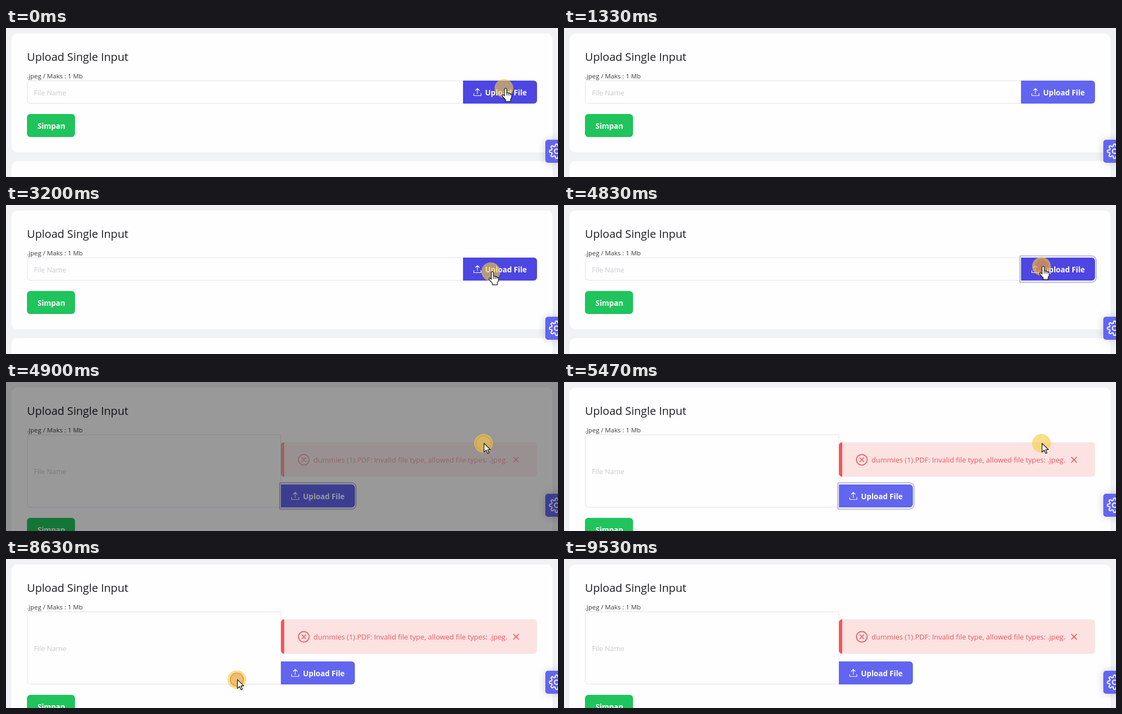
An HTML page with a canvas for the animation above (9560 ms loop, 1000 by 272 pixels).

```html
<!DOCTYPE html>
<html lang="id">
<head>
<meta charset="utf-8">
<title>Upload Single Input</title>
<style>
html, body { margin: 0; width: 100%; height: 100%; overflow: hidden; background: #f1f2f6; }
canvas { display: block; }
</style>
</head>
<body>
<canvas id="stage" width="1000" height="272"></canvas>
<script>
const ctx = document.getElementById('stage').getContext('2d');
const W = 1000, H = 272, LOOP = 9560;
const FONT = '"Open Sans", "Noto Sans", sans-serif';
const PAGE = '#f1f2f6', CARD = '#fefefe', PRIMARY = '#6265ef', HOVER = '#4d46e2';
const GREEN = '#20c45c', DANGER = '#e8585c';
const REJECTED = 4870, BLUR = 8600;
const CLICKS = [3240, 4780, 8570];

// Cursor keys: time, x, y
const PATH = [
  [0, 902, 110], [40, 902, 110], [300, 915, -50], [2329, 917, -50], [2330, 917, -19],
  [2900, 880, 118], [3270, 878, 122], [3300, 878, 122], [4170, 865, 112], [8030, 865, 112],
  [8400, 418, 218], [8570, 418, 218], [9270, 430, 320], [LOOP, 430, 320]
];

const clamp = v => Math.max(0, Math.min(1, v));
const progress = (t, from, to) => clamp((t - from) / (to - from));
const ease = p => p * p * (3 - 2 * p);

function cursorAt(t) {
  const i = Math.max(1, PATH.findIndex(k => k[0] > t));
  const [t0, x0, y0] = PATH[i - 1], [t1, x1, y1] = PATH[i];
  const p = ease(progress(t, t0, t1));
  return { x: x0 + (x1 - x0) * p, y: y0 + (y1 - y0) * p };
}

function box(x, y, w, h, radius, fill, stroke, width = 1) {
  ctx.beginPath();
  ctx.roundRect(x, y, w, h, radius);
  if (fill) { ctx.fillStyle = fill; ctx.fill(); }
  if (stroke) { ctx.strokeStyle = stroke; ctx.lineWidth = width; ctx.stroke(); }
}

function disc(x, y, r, fill, stroke, width) {
  box(x - r, y - r, 2 * r, 2 * r, r, fill, stroke, width);
}

function label(text, x, y, size, color, weight = 400) {
  ctx.font = `${weight} ${size}px ${FONT}`;
  ctx.fillStyle = color;
  ctx.fillText(text, x, y);
}

function strokePath(d, x, y, color, width) {
  ctx.save();
  ctx.translate(x, y);
  ctx.strokeStyle = color;
  ctx.lineWidth = width;
  ctx.lineCap = ctx.lineJoin = 'round';
  ctx.stroke(new Path2D(d));
  ctx.restore();
}

function drawUploadButton(x, y, hovered, focused) {
  if (focused) box(x - 2, y - 3, 138, 48, [1, 8, 8, 1], '#ffffff', '#bbbbd8', 2);
  box(x, y, 134, 42, [0, 6, 6, 0], hovered ? HOVER : PRIMARY);
  strokePath('M0 9v4h13v-4 M6.5 9.5V0 M3 3.5L6.5 0L10 3.5', x + 19.5, y + 14.5, '#f6f6fc', 1.2);
  label('Upload File', x + 40, y + 27, 13.6, '#ffffff', 700);
}

function drawAlert(opacity) {
  ctx.save();
  ctx.globalAlpha = opacity;
  box(498, 110, 464, 63, 6, '#fde2e2');
  box(498, 110, 6, 63, [6, 0, 0, 6], '#fb5252');
  disc(539.5, 142, 9.7, null, DANGER, 1.7);
  strokePath('M-3.5-3.5L3.5 3.5M3.5-3.5L-3.5 3.5', 539.5, 142, DANGER, 1.7);
  label('dummies (1).PDF: Invalid file type, allowed file types: .jpeg.', 557, 147, 13, DANGER);
  strokePath('M-4.5-4.5L4.5 4.5M4.5-4.5L-4.5 4.5', 924, 142, DANGER, 1.7);
  ctx.restore();
}

function drawSettingsTab() {
  ctx.save();
  ctx.shadowColor = 'rgba(90,90,120,.3)';
  ctx.shadowBlur = 14;
  box(977, 204, 30, 42, 5, PRIMARY);
  ctx.restore();
  ctx.beginPath();
  for (let i = 0; i <= 96; i++) {
    const a = i / 96 * 2 * Math.PI;
    const r = 11.2 + 1.9 * Math.tanh(2.5 * Math.cos(8 * a));
    ctx.lineTo(997.5 + r * Math.cos(a), 225 + r * Math.sin(a));
  }
  ctx.closePath();
  ctx.strokeStyle = '#f6f6fc';
  ctx.lineWidth = 2;
  ctx.stroke();
  disc(997.5, 225, 4, null, '#f6f6fc', 2);
}

function drawCursor(t, { x, y }, pointing) {
  disc(x, y, 17, 'rgba(245,205,70,.62)');
  for (const start of CLICKS) {
    const age = t - start;
    if (age < 0 || age > 400) continue;
    const fade = 1 - age / 400, r = 10 + age * 0.03;
    disc(x, y, r, `rgba(220,85,40,${0.45 * clamp(1 - age / 130)})`,
      `rgba(225,130,45,${0.7 * fade})`, 2);
  }
  const shape = new Path2D(pointing
    ? 'M0 2Q0 0 2 0T4 2V8L7 8.5L10 9.5L13 11.5V17L11 20V24H2V21L-4 14.5Q-4.5 11-2 12L0 14Z'
    : 'M0 0V16L4 12.5L6.5 18.5L9 17.5L6.5 11.5H11.5Z');
  ctx.save();
  ctx.translate(x + 1, y);
  ctx.lineJoin = 'round';
  ctx.lineWidth = 1.2;
  ctx.fillStyle = '#fff';
  ctx.strokeStyle = '#111';
  ctx.fill(shape);
  ctx.stroke(shape);
  if (pointing) strokePath('M4 8V13M7 9V13M10 10V13', 0, 0, '#111', 1);
  ctx.restore();
}

function drawBackdrop(opacity) {
  ctx.fillStyle = `rgba(0,0,0,${0.4 * opacity})`;
  ctx.fillRect(0, 0, W, H);
}

function draw(t) {
  const rejected = t >= REJECTED;
  const cursor = cursorAt(t);
  const button = rejected ? { x: 498, y: 187 } : { x: 828, y: 96 };
  const hovered = cursor.x >= button.x && cursor.x <= button.x + 134 &&
    cursor.y >= button.y && cursor.y <= button.y + 42;
  const shift = rejected ? 91 : 0;

  ctx.fillStyle = PAGE;
  ctx.fillRect(0, 0, W, H);
  box(10, 10, 980, 217 + shift, 11, CARD);
  box(10, 243 + shift, 980, 60, 11, CARD);

  label('Upload Single Input', 38, 60, 20.1, '#1c1c22');
  label('.jpeg / Maks : 1 Mb', 38, 92, 11.6, '#3c3c46');
  box(38.5, 96.5, button.x - 38.5, 41 + shift, [6, 0, 0, 6], null, '#e2e3ea');
  label('File Name', 50.5, rejected ? 168 : 123, 12.7, '#cacad2');

  if (rejected) drawAlert(0.45 + 0.55 * progress(t, 4880, 5200));
  drawUploadButton(button.x, button.y, hovered, t >= CLICKS[0] && t < BLUR);
  box(38, 157 + shift, 87, 42, 6, GREEN);
  label('Simpan', 57, 184 + shift, 13.5, '#ffffff', 700);
  drawSettingsTab();

  if (rejected) drawBackdrop(1 - progress(t, 5000, 5200));
  drawCursor(t, cursor, hovered);
}

function frame() {
  draw(performance.now() % LOOP);
  requestAnimationFrame(frame);
}
frame();
</script>
</body>
</html>
```
